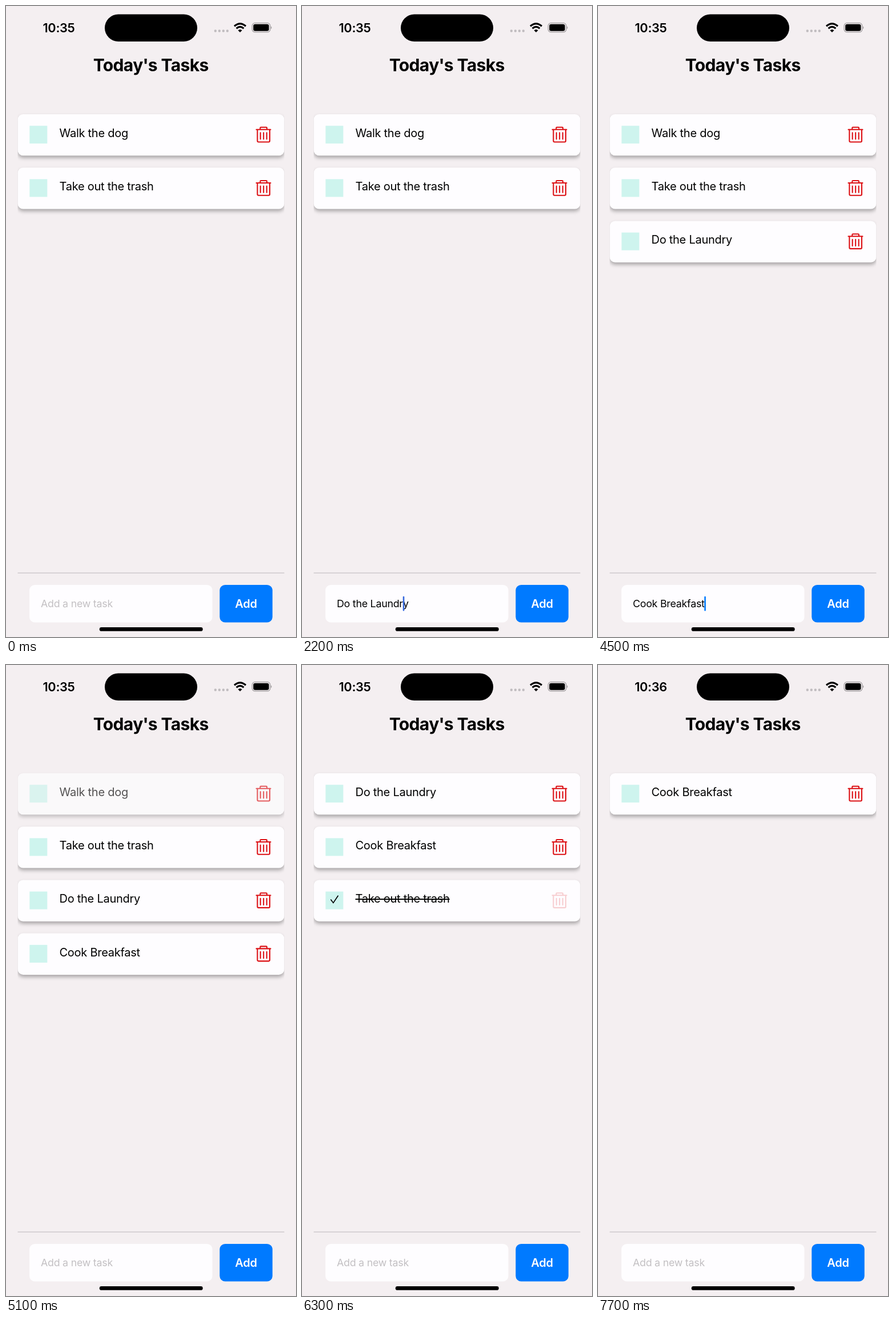
Recreate the animation shown at these times as an HTML page. Size 508x1102 px, loop 7.8 s.

```html
<!DOCTYPE html>
<html lang="en">
<head>
<meta charset="utf-8">
<title>Today's Tasks</title>
<style>
  html, body { margin: 0; width: 100%; height: 100%; overflow: hidden; background: #f4eff1; }
  svg { display: block; }
  text { font: 20px Inter, sans-serif; letter-spacing: -.013em; white-space: pre; }
  .mid { text-anchor: middle; }
  .card { fill: #fefdff; }
  .row .card { filter: drop-shadow(0 4px 3px rgba(0, 0, 0, .3)); }
  .trash { fill: none; stroke: #dc1014; stroke-width: 2.1; stroke-linecap: round; stroke-linejoin: round; }
  .check { fill: none; stroke: #000; stroke-width: 1.7; stroke-linecap: round; }
  #title { font-size: 30px; font-weight: 700; letter-spacing: -.021em; }
  #clock { font-size: 21.7px; font-weight: 600; }
  #field { font-size: 17.8px; }
  #add text { font-weight: 600; fill: #fff; }
</style>
</head>
<body>
<svg width="508" height="1102" viewBox="0 0 508 1102">
  <defs>
    <clipPath id="list"><rect x="20.5" y="160" width="467" height="820"/></clipPath>
  </defs>

  <text id="clock" class="mid" x="92.5" y="46">10:35</text>
  <rect x="173" y="14.5" width="162" height="47.5" rx="23.7"/>
  <path d="M366.8 43.5h22" stroke="#c0bcbf" stroke-width="4.4" stroke-linecap="round" stroke-dasharray="0 7"/>
  <g fill="none" stroke="#000" stroke-width="3.2">
    <path d="M400 35.3Q410 26.5 420 35.3"/>
    <path d="M403.6 39.2Q410 33.6 416.4 39.2"/>
  </g>
  <path d="M406.4 42.4Q410 39.4 413.6 42.4L410 46z"/>
  <rect x="431.2" y="29.7" width="31.6" height="16" rx="5" fill="none" stroke="#a19d9f" stroke-width="1.3"/>
  <rect x="433.2" y="31.8" width="27.4" height="11.9" rx="3.3"/>
  <path d="M464 35.2q3 2.5 0 5z" fill="#a19d9f"/>

  <text id="title" class="mid" x="253.7" y="114">Today's Tasks</text>
  <g id="rows" clip-path="url(#list)"></g>

  <rect x="20.5" y="989.5" width="467" height="1.4" fill="#cbc7ca"/>
  <rect class="card" x="41" y="1011" width="320.5" height="65.5" rx="9.5"/>
  <text id="field" x="61" y="1050"></text>
  <rect id="caret" y="1031" width="2.6" height="25.5" rx="1"/>
  <g id="add">
    <rect x="374.3" y="1011" width="92.5" height="65.5" rx="9.5" fill="#007aff"/>
    <text class="mid" x="420.5" y="1051">Add</text>
  </g>
  <rect x="163.7" y="1085" width="181" height="6.8" rx="3.4"/>
</svg>
<script>
const LOOP = 7800, PITCH = 93.2;
const $ = id => document.getElementById(id);
const tasks = { w: 'Walk the dog', t: 'Take out the trash', l: 'Do the Laundry', c: 'Cook Breakfast' };

// List order from each moment on; capitals are open tasks, small letters are done.
const orders = [
  [0, 'WT'], [2420, 'WTL'], [4720, 'WTLC'], [5200, 'TLCw'], [5590, 'LCwt'],
  [6040, 'LCt'], [6440, 'LC'], [7190, 'Cl'], [7650, 'C']
];

// Touches as [down, release, fully restored].
const rowTouches = [[[5050, 5200, 5450], [5420, 5590, 5840], [7050, 7290, 7420]]];
const trashTouches = {
  1: [[7510, 7650, 7900]],
  2: [[5880, 6040, 6290], [6150, 6440, 6690]]
};
const addTouches = [[2330, 2420, 2600], [4630, 4720, 4900]];

// Focus sessions of the input field.
const sessions = [
  { focus: 1060, start: 1200, step: 72, text: tasks.l, end: 2420 },
  { focus: 2760, start: 3090, step: 100, text: tasks.c, end: 4720 }
];

const clamp = v => Math.max(0, Math.min(1, v));

function opacity(t, touches = []) {
  return Math.min(1, ...touches.map(([down, up, end]) =>
    t < down || t > end ? 1
      : t < up ? 1 - .8 * clamp((t - down) / 120)
      : .2 + .8 * (t - up) / (end - up)));
}

$('rows').innerHTML = [0, 1, 2, 3].map(i => `
  <g class="row" transform="translate(0 ${189 + i * PITCH})">
    <rect class="card" x="20.5" width="467" height="72.3" rx="9.5"/>
    <rect x="41.3" y="20.2" width="31" height="31" fill="#cef4ee"/>
    <path class="check" d="M50.7 34.5L54.8 40L63 27.8"/>
    <text x="93.5" y="40"></text>
    <path class="trash" d="M438.5 26.8H463.5M445.3 26.5V24q0-1.2 1.2-1.2H455.8q1.2 0 1.2 1.2V26.5M440.4 27V46.5q0 2 2 2H460q2 0 2-2V27M445.7 32.3V43.5M451.2 32.3V43.5M456.7 32.3V43.5"/>
  </g>`).join('');

const rows = [...document.querySelectorAll('.row')].map(node => ({
  node,
  check: node.querySelector('.check'),
  label: node.querySelector('text'),
  trash: node.querySelector('.trash')
}));

function drawRows(t) {
  const order = orders.filter(([from]) => from <= t).pop()[1];
  rows.forEach((row, i) => {
    const key = order[i];
    row.node.style.display = key ? '' : 'none';
    if (!key) return;
    const done = key === key.toLowerCase();
    row.node.style.opacity = opacity(t, rowTouches[i]);
    row.trash.style.opacity = opacity(t, trashTouches[i]);
    row.check.style.display = done ? '' : 'none';
    row.label.textContent = tasks[key.toLowerCase()];
    row.label.style.textDecoration = done ? 'line-through' : 'none';
  });
}

function drawField(t) {
  const field = $('field'), caret = $('caret');
  const s = sessions.find(s => t >= s.focus && t < s.end);
  const typed = s ? s.text.slice(0, Math.max(0, Math.floor((t - s.start) / s.step) + 1)) : '';
  field.textContent = typed || 'Add a new task';
  field.setAttribute('fill', typed ? '#000' : '#c3c0c3');
  caret.style.display = s ? '' : 'none';
  if (!s) return;
  // The caret trails the text by one keystroke.
  const at = Math.max(0, Math.min(typed.length, Math.floor((t - s.start) / s.step)));
  caret.setAttribute('x', 60.6 + (at ? field.getSubStringLength(0, at) : 0));
  caret.setAttribute('fill', t < 3200 ? '#3568dc' : '#007aff');
}

function draw(now) {
  const t = now % LOOP;
  $('clock').textContent = t < 6900 ? '10:35' : '10:36';
  $('add').style.opacity = opacity(t, addTouches);
  drawRows(t);
  drawField(t);
  requestAnimationFrame(draw);
}

draw(0);
</script>
</body>
</html>
```
